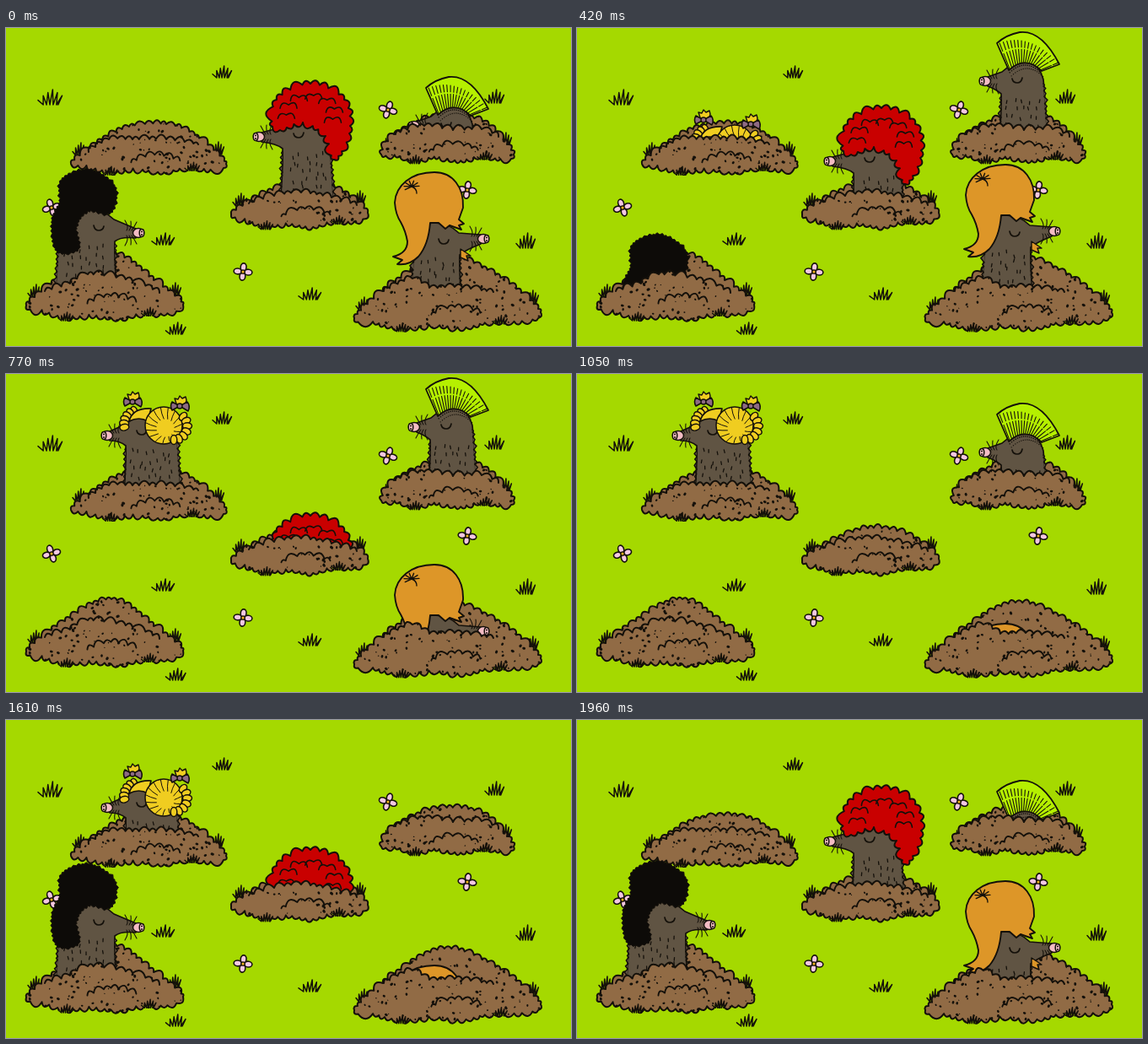
An HTML page with a canvas that plays this animation: 670x377 px, repeating every 2.03 s.

```html
<!DOCTYPE html>
<html lang="en">
<head>
<meta charset="utf-8">
<title>Moles</title>
<style>
html, body { margin: 0; width: 100%; height: 100%; overflow: hidden; background: #a5d900; }
canvas { display: block; }
</style>
</head>
<body>
<canvas id="stage" width="670" height="377"></canvas>
<script>
const ctx = document.getElementById('stage').getContext('2d');
const LOOP = 2030, STEP = 70;
const GREEN = '#a5d900', INK = '#14100a', SOIL = '#916b45', FUR = '#605443', PINK = '#f3bcc4',
  YELLOW = '#f0cd20', MAUVE = '#8d6a83', RED = '#c90000', ORANGE = '#dd9628';

let seed = 7;
const rand = (a, b) => {
  seed = (seed * 16807) % 2147483647;
  return a + (b - a) * seed / 2147483647;
};
const clamp = (v, lo, hi) => Math.min(hi, Math.max(lo, v));
const progress = (t, [from, to]) => clamp((t - from) / (to - from), 0, 1);

// Catmull-Rom point between b and c.
const spline = (a, b, c, d, u) => b.map((_, k) =>
  b[k] + u / 2 * (c[k] - a[k] + u * (2 * a[k] - 5 * b[k] + 4 * c[k] - d[k] + u * (3 * (b[k] - c[k]) + d[k] - a[k]))));

// Runs scallops, or spikes when sharp, along a smooth line through a few points.
function scallop(pts, size, { closed = false, bulge = .8, sharp = false } = {}) {
  const n = pts.length, spots = [pts[0]];
  const at = i => closed ? pts[(i + n) % n] : pts[clamp(i, 0, n - 1)];
  for (let i = 0; i < (closed ? n : n - 1); i++) {
    const near = [-1, 0, 1, 2].map(k => at(i + k)), [, b, c] = near;
    const steps = Math.max(1, Math.round(Math.hypot(c[0] - b[0], c[1] - b[1]) / size));
    for (let k = 1; k <= steps; k++)
      spots.push(spline(...near, k < steps ? (k + rand(-.25, .25)) / steps : 1));
  }
  let d = `M${spots[0]}`;
  for (let i = 1; i < spots.length; i++) {
    const [x0, y0] = spots[i - 1], [x1, y1] = spots[i], out = bulge * rand(.8, 1.2);
    const mid = [(x0 + x1) / 2 + (y1 - y0) * out, (y0 + y1) / 2 - (x1 - x0) * out];
    d += sharp ? `L${mid}L${x1},${y1}` : `Q${mid} ${x1},${y1}`;
  }
  return d + (closed ? 'Z' : '');
}

function shape(path, fill, width = 1.7) {
  const p = path instanceof Path2D ? path : new Path2D(path);
  if (fill) { ctx.fillStyle = fill; ctx.fill(p); }
  if (width) { ctx.lineWidth = width; ctx.strokeStyle = INK; ctx.stroke(p); }
}

function oval(x, y, rx, ry, fill, width = 1.5, turn = 0) {
  const p = new Path2D();
  p.ellipse(x, y, rx, ry, turn, 0, 7);
  shape(p, fill, width);
}

// Zigzag of blades whose tips spread wider than their bases.
function grass(x, y, w = 26, h = 14) {
  let d = `M${x - w / 2},${y - h * .3}`;
  for (let u = -.4; u < .45; u += .2)
    d += `L${x + u * w * .7},${y}L${x + (u + .12) * w},${y - h * (1 - Math.abs(u))}`;
  shape(d + `L${x + w * .35},${y}`, GREEN, 1.5);
}

function flower(x, y, turn) {
  for (let i = 0; i < 4; i++) {
    const a = turn + i * Math.PI / 2;
    oval(x + 6.3 * Math.cos(a), y + 5.6 * Math.sin(a), 4.6, 3.4, '#f4c8e2', 1.6, a);
  }
  oval(x, y, 2.2, 2.2, '#f3b51d', 1.3);
}

// Beads along an arc, angles in turns.
function braid(x, y, r, from, to, count = 7) {
  for (let i = 0; i < count; i++) {
    const a = 2 * Math.PI * (from + (to - from) * i / (count - 1));
    oval(x + r * Math.cos(a), y + r * Math.sin(a), 5.5, 3.8, YELLOW, 1.5, a);
  }
}

function ribbon(x, y) {
  shape(`M${x - 3},${y}l-3,-9l4,1l2,-4l3,3l4,-2l1,4l-2,8z`, YELLOW, 1.4);
  shape(`M${x},${y}l-9,-5q-3,5 0,10zl9,-5q4,5 1,11z`, MAUVE, 1.6);
  oval(x, y, 3, 3, MAUVE, 1.4);
}

function braidsWig() {
  braid(157, 60, 17, -.3, -.53, 6);
  ribbon(150, 33);
  shape('M146,56Q150,40 172,41L168,56Q158,50 146,56Z', YELLOW);
  oval(187, 61, 22, 22, YELLOW);
  let strands = '';
  for (let a = -3; a < 3; a += .42) {
    const c = Math.cos(a), s = Math.sin(a);
    strands += `M${187 + 21 * c},${61 + 21 * s}Q${187 + 16 * c},${63 + 16 * s} ${189 + 11 * c},${64 + 11 * s}`;
  }
  shape(strands, null, 1);
  braid(199, 62, 16, -.13, .25);
  ribbon(206, 38);
}

const afro = new Path2D(scallop([[316, 117], [321, 85], [361, 66], [401, 85], [407, 125], [389, 156], [379, 128],
  [352, 112], [325, 121]], 10, { closed: true }));
let curls = '';
for (let i = 0; i < 7; i++) {
  const x = 361 + 29 * Math.cos(i * .62 - 3.3), y = 100 + 20 * Math.sin(i * .62 - 3.3);
  curls += scallop([[x - 10, y + 4], [x, y], [x + 10, y + 4]], 8);
}
function afroWig() {
  shape(afro, RED, 2);
  shape(curls, null, 1.6);
}

function mohawkWig() {
  let strands = '';
  for (let u = .03; u < 1; u += .06) {
    const x = 499 + 72 * u, y = 19 + 23 * u - 54 * u * (1 - u);
    const bx = 512 + 39 * u, by = 50 - 40 * u * (1 - u);
    const dx = bx - x, dy = by - y;
    strands += `M${bx},${by}L${bx - dx * .6},${by - dy * .6}M${x},${y}l${dx * .3},${dy * .3}`;
    oval(bx, by + 4, .8, .8, INK, 0);
    oval(bx + 2, by + 8, .7, .7, INK, 0);
  }
  shape('M498,18Q509,8 525,5Q551,2 572,43L551,51Q532,32 512,50Z', '#b5f000', 1.8);
  shape(strands, null, 1.1);
}

const quiff = new Path2D(scallop([[60, 264], [55, 228], [64, 207], [66, 180], [98, 168], [129, 188], [124, 219],
  [97, 217], [83, 236], [86, 262]], 5, { closed: true, bulge: .35, sharp: true }));
const quiffWig = () => shape(quiff, '#0d0b08', 1);

function fringeWig() {
  shape('M539,253l12,8l-5,0l2,6l-9,-4z', ORANGE, 1.4);
  shape('M461,198C462,178 480,162 508,162C530,162 543,180 542,204L537,218L543,223L537,225L540,230' +
    'L526,225L521,229L513,222L503,222Q501,248 489,262Q478,273 464,271L470,266L459,262' +
    'Q476,258 476,244Q474,232 468,221Q462,212 461,198Z', ORANGE, 1.9);
  let crown = '';
  for (let a = 2.6; a < 6.4; a += .6) crown += `M481,179l${9 * Math.cos(a)},${7 * Math.sin(a)}`;
  shape(crown + 'M481,179q6,2 6,8', null, 1.4);
}

// top: crest of the mound, rim: front edge of the hole. The mole is placed by its eye,
// sinks by drop during down and comes back during up (times may pass the loop's end).
const holes = [
  { top: [[77, 161], [108, 137], [146, 117], [190, 114], [224, 127], [261, 161]], sag: 8,
    rim: [[98, 147], [122, 132], [150, 132], [190, 132], [228, 138]],
    wig: braidsWig, eye: [161, 68], dir: -1, nose: [41, 5], back: 43,
    drop: 122, down: [1475, 2010], up: [2310, 2680] },
  { top: [[267, 221], [300, 200], [345, 183], [390, 190], [429, 219]], sag: 14,
    rim: [[288, 208], [318, 199], [350, 195], [386, 201], [416, 210]],
    wig: afroWig, eye: [347, 126], dir: -1, nose: [47, 3], back: 38,
    drop: 142, down: [280, 960], up: [1350, 2030] },
  { top: [[445, 150], [462, 126], [512, 105], [565, 111], [602, 150]], sag: 5,
    rim: [[460, 126], [496, 116], [530, 121], [564, 120], [584, 129]],
    wig: mohawkWig, eye: [522, 61], dir: -1, nose: [38, 2], back: 33,
    drop: 126, down: [900, 1540], up: [1660, 2300] },
  { top: [[24, 329], [70, 293], [125, 267], [175, 299], [210, 328]], sag: 14,
    rim: [[46, 312], [76, 303], [97, 292], [150, 300], [182, 314]],
    wig: quiffWig, eye: [110, 236], dir: 1, nose: [47, 7], back: 48,
    drop: 142, down: [75, 715], up: [985, 1625] },
  { top: [[413, 344], [462, 301], [520, 271], [580, 292], [634, 337]], sag: 13,
    rim: [[448, 312], [482, 297], [502, 308], [532, 307], [578, 313]],
    wig: fringeWig, eye: [519, 243], dir: 1, nose: [47, -2], back: 36,
    drop: 160, down: [515, 1155], up: [1502, 2062] },
];

function buildMound(h) {
  const [left, right] = [h.top[0], h.top[h.top.length - 1]];
  const foot = u => [right[0] + (left[0] - right[0]) * u, right[1] + (left[1] - right[1]) * u
    + h.sag * Math.sqrt(Math.sin(Math.PI * u)) + 2.5 * Math.sin(6 * Math.PI * u)];
  const base = [.1, .2, .3, .4, .5, .6, .7, .8, .9].map(foot);
  const rim = scallop(h.rim, 10);
  const [start, end] = [h.rim[0], h.rim[4]];
  const [mx, my] = foot(.46), ry = my * .55 + h.rim[2][1] * .45;
  h.mound = new Path2D(scallop([...h.top, ...base], 9, { closed: true }));
  h.rimLine = new Path2D(rim);
  h.opening = new Path2D(`${rim}L${end[0]},-20L${start[0]},-20Z`);
  h.ridge = new Path2D(scallop([[mx - 28, ry + 6], [mx, ry - 3], [mx + 30, ry + 4]], 11));
  h.sides = [[left[0] + 10, left[1] - 10], [right[0] - 11, right[1] - 11]];
  h.feet = [foot(.22), foot(.75)];

  h.specks = new Path2D();
  const low = my + 4, high = h.rim[2][1] - 25;
  for (let i = 0; i < (right[0] - left[0]) * (low - high) / 125; i++) {
    const x = rand(left[0], right[0]), y = rand(high, low), r = rand(.7, 2.2);
    h.specks.moveTo(x, y);
    h.specks.ellipse(x, y, r, r * .75, rand(0, 3), 0, 6.28);
  }
}

// Body in its own space: eye at 0,0 and nose to the right.
function buildMole(h) {
  const [nx, ny] = h.nose, b = h.back;
  h.body = new Path2D(`M${nx - 3},${ny - 5}L18,-9Q6,-21 -12,-21Q${8 - b},-20 ${2 - b},0Q${-b - 1},30 ${-b - 5},110` +
    `L24,110Q18,40 19,17Q26,11 ${nx - 3},${ny + 6}Z`);
  const spiky = { sharp: true, bulge: .4 };
  h.fringe = new Path2D(scallop([[-b - 4, 90], [-b, 35], [2 - b, 5]], 6, spiky) +
    scallop([[19, 20], [19, 45], [22, 90]], 6, spiky));
  let d = '';
  for (let y = 20; y < 75; y += 10)
    for (let x = 6 - b; x < 12; x += 9)
      d += `M${x + rand(0, 6)},${y + rand(0, 7)}l${rand(-1, 1)},3.5`;
  h.hairs = new Path2D(d);
  d = '';
  for (const s of [-1, 1])
    for (let i = 0; i < 3; i++)
      d += `M${nx - 8 - 3 * i},${ny + s * 3}q3,${s * 4} ${6 - 4 * i},${s * (10 + i)}`;
  h.whiskers = new Path2D(d);
}

function drawMole(h) {
  const [nx, ny] = h.nose;
  ctx.save();
  ctx.translate(...h.eye);
  ctx.scale(h.dir, 1);
  shape(h.body, FUR);
  shape(h.fringe, FUR, 1.5);
  shape(h.hairs, null, 1.3);
  shape('M-6,-2q1,6 6,6q5,0 6,-5', null, 1.7);
  shape(h.whiskers, null, 1.1);
  oval(nx, ny, 6.5, 5.5, PINK);
  oval(nx + 4, ny, 2.8, 4.4, PINK);
  for (const s of [-1.5, 2]) oval(nx + 4, ny + s, 1, 1, INK, 0);
  ctx.restore();
  h.wig();
}

function depth({ drop, down, up }, t) {
  if (t < down[0]) t += LOOP;
  return Math.round(drop * (progress(t, down) - progress(t, up)));
}

function drawHole(h, t) {
  for (const [x, y] of h.sides) grass(x, y, 16, 15);
  shape(h.mound, SOIL, 2);
  ctx.save();
  ctx.clip(h.mound);
  shape(h.specks, INK, 0);
  ctx.restore();
  shape(h.ridge, null, 1.9);

  ctx.save();
  ctx.clip(h.opening);
  ctx.translate(0, depth(h, t));
  drawMole(h);
  ctx.restore();

  shape(h.rimLine, null, 2);
  for (const [x, y] of h.feet) grass(x, y + 4, 17, 10);
}

function draw() {
  const t = Math.floor(performance.now() % LOOP / STEP) * STEP;
  ctx.fillStyle = GREEN;
  ctx.fillRect(0, 0, 670, 377);
  ctx.lineJoin = ctx.lineCap = 'round';

  grass(52, 91, 28, 18);
  grass(256, 59, 22);
  grass(579, 89, 22, 16);
  grass(186, 257);
  grass(616, 261, 22, 18);
  grass(360, 322);
  grass(201, 363, 23);
  flower(54, 213, -.3);
  flower(453, 97, .3);
  flower(547, 192, .15);
  flower(281, 289, .1);

  for (const h of holes) drawHole(h, t);
  requestAnimationFrame(draw);
}

holes.forEach(buildMound);
holes.forEach(buildMole);
draw();
</script>
</body>
</html>
```
